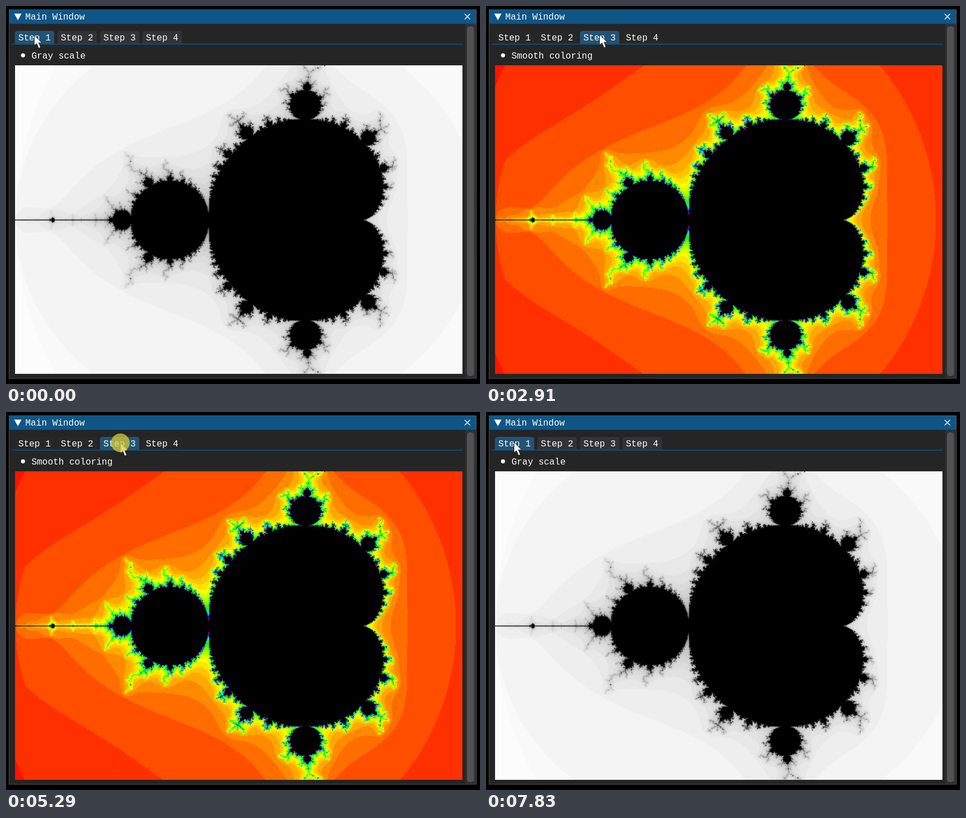
These frames come from a looping animation (837x669 px, 7.99 s). An HTML page with a canvas:

```html
<!DOCTYPE html>
<html lang="en">
<head>
<meta charset="utf-8">
<title>Mandelbrot coloring steps</title>
<style>
  html, body { margin: 0; width: 100%; height: 100%; overflow: hidden; background: #000; }
  svg { position: absolute; left: 0; top: 0; }
  #view { position: absolute; left: 15.7px; top: 105px; width: 790.8px; height: 546px; overflow: hidden; }
  canvas { display: block; width: 819px; height: 546px; }
  text { font: 15.925px "Liberation Mono", monospace; fill: #fff; white-space: pre; }
</style>
</head>
<body>
<svg width="837" height="669">
  <rect x="5.5" y="6.5" width="825" height="652.5" fill="#252526" stroke="#4e4e4e"/>
  <rect x="6" y="7" width="824" height="24.5" fill="#0f5687"/>
  <path d="M14.5 13.5H27.5L21 25Z" fill="#fff"/>
  <text x="34" y="24">Main Window</text>
  <path d="M810 14l9.5 9.5M819.5 14l-9.5 9.5" stroke="#fff" stroke-width="1.4"/>
  <rect x="811" y="32" width="18.5" height="626" fill="#303033"/>
  <rect x="814" y="36" width="12.5" height="619" rx="5" fill="#525256"/>
  <g id="tabs"></g>
  <rect x="10" y="66.8" width="796.5" height="1.4" fill="#0f5687"/>
  <circle cx="30" cy="87.3" r="3.6" fill="#fff"/>
  <text id="caption" x="45" y="93"></text>
</svg>
<div id="view"><canvas id="fractal" width="600" height="400"></canvas></div>
<svg width="837" height="669">
  <path id="cursor" d="M0 0V18.5L4.2 14.8L7.8 23.3L11.2 21.8L7.6 13.6H13.2Z" fill="#fff" stroke="#111" stroke-width=".8"/>
  <circle id="press" r="16.5" fill="#d4cc34" opacity=".75"/>
</svg>
<script>
const LOOP = 7990, W = 600, H = 400, MAX_ITER = 80;
const CAPTIONS = ['Gray scale', 'HSV colors', 'Smooth coloring', 'Histogram coloring'];
const SWITCHES = [[0, 0], [920, 1], [2200, 2], [3650, 3], [5170, 2], [6510, 1], [7700, 0]];
const PRESSES = [[890, 1050], [2170, 2500], [3620, 3800], [5140, 5460], [6480, 6640], [7670, 7830]];
const START = [50, 51.5];
// start time, end time, x, y
const MOVES = [
  [80, 880, 127, 50.5], [1330, 2150, 200.5, 50.5], [2850, 3620, 271.5, 52.5],
  [4310, 5120, 202, 54.5], [5800, 6480, 126.5, 56.5], [6950, 7670, 49.5, 53.5]
];
const $ = id => document.getElementById(id);

// Escape counts, and their smooth version
const count = new Uint8Array(W * H), smooth = new Float64Array(W * H);
for (let i = 0; i < W * H; i++) {
  const cr = -2 + 3 * (i % W) / W, ci = -1 + 2 * Math.floor(i / W) / H;
  let x = 0, y = 0, n = 0;
  while (x * x + y * y <= 4 && n < MAX_ITER) {
    [x, y] = [x * x - y * y + cr, 2 * x * y + ci];
    n++;
  }
  count[i] = n;
  smooth[i] = n === MAX_ITER ? n : n + 1 - Math.log(Math.log2(Math.hypot(x, y)));
}

// Cumulative share of escaping points up to each level
const histogram = new Array(MAX_ITER + 1).fill(0);
let total = 0;
smooth.forEach((m, i) => {
  if (count[i] < MAX_ITER) { histogram[Math.floor(m)]++; total++; }
});
let sum = 0;
const share = histogram.map(v => (sum += v / total));

function grayColor(i) {
  const n = count[i], level = n > 2 ? 2 * Math.ceil(n / 2) - 0.5 : n;
  const v = 255 - Math.floor(level * 255 / MAX_ITER);
  return [v, v, v];
}

// Hue runs from 0 to 255 and falls into bands of five
function hueColor(hue) {
  const h = Math.max(3, Math.floor((hue - 1) / 5) * 5 + 3) / 255 * 6;
  return [0, 4, 2].map(k =>
    255 * Math.min(1, Math.max(0, Math.abs((h + k) % 6 - 3) - 1)));
}

function histogramHue(m) {
  const low = share[Math.floor(m)], high = share[Math.ceil(m)];
  return 255 - Math.floor(255 * (low + (high - low) * (m % 1)));
}

const colorings = [
  grayColor,
  i => hueColor(Math.floor(255 * count[i] / MAX_ITER)),
  i => hueColor(Math.floor(255 * smooth[i] / MAX_ITER)),
  i => hueColor(histogramHue(smooth[i]))
];
const pictures = colorings.map(color => {
  const image = new ImageData(W, H);
  for (let i = 0; i < W * H; i++) {
    image.data.set(count[i] < MAX_ITER ? color(i) : [0, 0, 0], i * 4);
    image.data[i * 4 + 3] = 255;
  }
  return image;
});

const tabLeft = k => 15.7 + 75.1 * k;
$('tabs').innerHTML = CAPTIONS.map((_, k) => {
  const x = tabLeft(k);
  return `<path d="M${x} 67V49q0-5 5-5h59.5q5 0 5 5V67Z"/><text x="${x + 6}" y="61">Step ${k + 1}</text>`;
}).join('');
const tabs = $('tabs').querySelectorAll('path');
const context = $('fractal').getContext('2d');

const ease = p => p < 0.5 ? 4 * p ** 3 : 1 - 4 * (1 - p) ** 3;

function cursorAt(t) {
  let [x, y] = START;
  for (const [from, to, endX, endY] of MOVES) {
    const p = ease(Math.min(1, Math.max(0, (t - from) / (to - from))));
    x += (endX - x) * p;
    y += (endY - y) * p;
  }
  return [x, y];
}

let shown = -1;
function showStep(step) {
  if (step === shown) return;
  shown = step;
  context.putImageData(pictures[step], 0, 0);
  $('caption').textContent = CAPTIONS[step];
}

function frame(now) {
  const t = now % LOOP;
  const step = SWITCHES.filter(s => s[0] <= t).pop()[1];
  const [x, y] = cursorAt(t);
  showStep(step);
  const idle = step === 0 || step === 3 ? '#333337' : '#272728';
  tabs.forEach((tab, k) => {
    const hovered = x >= tabLeft(k) && x < tabLeft(k) + 69.5;
    tab.setAttribute('fill', hovered ? '#225376' : k === step ? '#0f5687' : idle);
  });
  for (const id of ['cursor', 'press']) $(id).setAttribute('transform', `translate(${x} ${y})`);
  const pressed = PRESSES.some(([from, to]) => t >= from && t < to);
  $('press').setAttribute('visibility', pressed ? 'visible' : 'hidden');
  requestAnimationFrame(frame);
}
frame(0);
</script>
</body>
</html>
```
